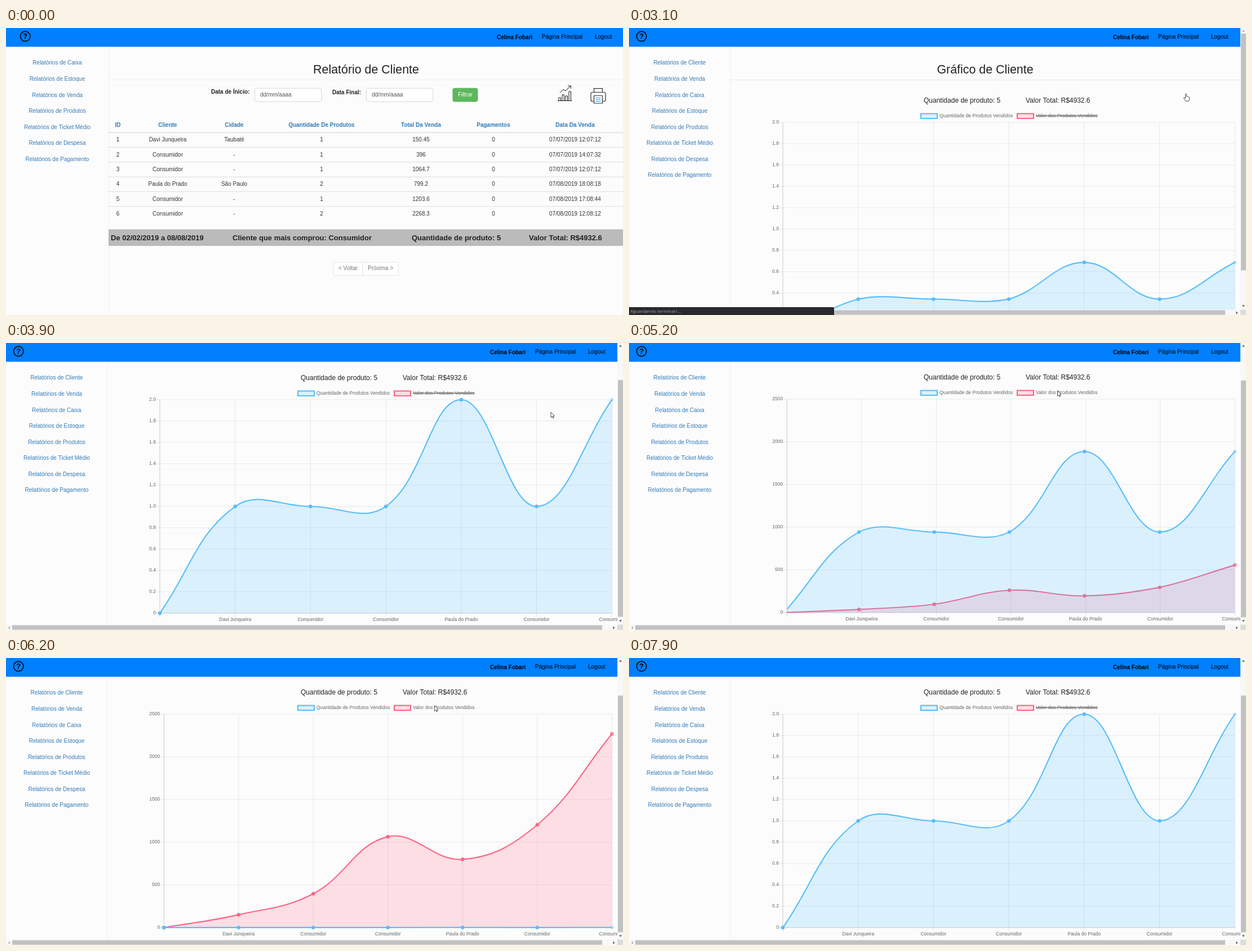
Recreate the animation shown at these times as an HTML page with a canvas. Size 1095 by 511 pixels, loop 8400 ms.

```html
<!DOCTYPE html>
<html lang="pt-BR">
<head>
<meta charset="utf-8">
<title>Relatório de Cliente</title>
<style>
  html, body { margin: 0; width: 100%; height: 100%; overflow: hidden; background: #fcfcfc; }
  canvas { display: block; width: 100vw; height: 100vh; }
</style>
</head>
<body>
<canvas id="stage" width="1095" height="511"></canvas>
<script>
const ctx = document.getElementById('stage').getContext('2d');
const W = 1095, H = 511, LOOP = 8400;
const SANS = '"Liberation Sans", Arial, sans-serif', UI = '"Open Sans", sans-serif';
const LINK = '#337ab7', BLUE = '86,190,252', PINK = '255,99,132';
const rgb = (c, alpha = 1) => `rgba(${c},${alpha})`;
const lerp = (a, b, u) => a + (b - a) * u;
const clamp = (v, lo = 0, hi = 1) => Math.min(hi, Math.max(lo, v));
const easeOut = (u, power) => 1 - (1 - clamp(u)) ** power;

const USER = 'Celina Fobari';
const BUYERS = ['Davi Junqueira', 'Consumidor', 'Consumidor', 'Paula do Prado', 'Consumidor', 'Consumidor'];
const QUANTITIES = [1, 1, 1, 2, 1, 2];
const TOTALS = [150.45, 396, 1064.7, 799.2, 1203.6, 2268.3];
const CITIES = ['Taubaté', '-', '-', 'São Paulo', '-', '-'];
const DATES = ['07/07/2019 12:07:12', '07/07/2019 14:07:32', '07/07/2019 12:07:12',
  '07/08/2019 18:08:18', '07/08/2019 17:08:44', '07/08/2019 12:08:12'];
const COLUMNS = [['ID', 198.5], ['Cliente', 287], ['Cidade', 405], ['Quantidade De Produtos', 560],
  ['Total Da Venda', 736.5], ['Pagamentos', 865], ['Data Da Venda', 1010]];

function text(str, x, y, { size = 10, color = '#333', align = 'left', bold = false, font = SANS } = {}) {
  ctx.font = `${bold ? 'bold ' : ''}${size}px ${font}`;
  ctx.fillStyle = color;
  ctx.textAlign = align;
  ctx.textBaseline = 'middle';
  ctx.fillText(str, x, y);
}
function rect(x, y, w, h, color) {
  ctx.fillStyle = color;
  ctx.fillRect(x, y, w, h);
}
function box(x, y, w, h, fill, stroke, radius = 3, width = 0.8) {
  ctx.beginPath();
  ctx.roundRect(x, y, w, h, radius);
  ctx.fillStyle = fill;
  ctx.fill();
  ctx.strokeStyle = stroke;
  ctx.lineWidth = width;
  ctx.stroke();
}
function path(d, x, y, stroke, width, fill) {
  const shape = new Path2D(d);
  ctx.save();
  ctx.translate(x, y);
  ctx.lineJoin = 'round';
  if (fill) { ctx.fillStyle = fill; ctx.fill(shape); }
  if (stroke) { ctx.strokeStyle = stroke; ctx.lineWidth = width; ctx.stroke(shape); }
  ctx.restore();
}

function header(width, shift) {
  rect(0, 0, width, 33.4, '#007fff');
  path('M8.7,0A8.7,8.7 0 1 1 -8.7,0A8.7,8.7 0 1 1 8.7,0', 34.2 - shift, 14.8, '#000', 1.6);
  text('?', 34.2 - shift, 15.3, { size: 13, bold: true, color: '#000', align: 'center' });
  text(USER, 871 - shift, 17, { bold: true, color: '#000' });
  text('Página Principal', 951 - shift, 16.2, { color: '#000' });
  text('Logout', 1045 - shift, 16.2, { color: '#000' });
}
function sidebar(topics, center, edge) {
  rect(edge - 0.5, 34, 1, H - 34, '#efefef');
  topics.forEach((topic, i) =>
    text('Relatórios de ' + topic, center, 62.7 + i * 28.55, { color: LINK, align: 'center' }));
}
function statusBar(str, width) {
  ctx.beginPath();
  ctx.roundRect(0, 497, width, 14, [0, 3, 0, 0]);
  ctx.fillStyle = '#292a2d';
  ctx.fill();
  text(str, 2.5, 504.5, { size: 8, color: '#a5a8ab', font: UI });
}

function chartIcon() {
  path('M0,27H25.5M2,27V21.5H5.5V27M8,27V16.5H11.5V27M14,27V18.5H17.5V27M20,27V10.5H23.5V27', 979, 102.5, '#111', 1);
  path('M4,13L10,7L14,9.5L23,.7M18,.5H23.3V5.5', 979, 102.5, '#111', 1);
}
function printerIcon() {
  path('M6,7.5V.7H21V7.5M6,23.5H3Q.5,23.5 .5,20.5V10.5Q.5,7.5 3,7.5H24Q26.5,7.5 26.5,10.5V20.5Q26.5,23.5 24,23.5H21', 1037.5, 107, '#333', 1.2);
  path('M6,13.5H21V27H6Z', 1037.5, 107, '#333', 1.2, '#fff');
  path('M9,17.5H18M9,20.5H18M9,23.5H18', 1037.5, 107, '#2f8fe0', 1);
}

function reportPage() {
  sidebar(['Caixa', 'Estoque', 'Venda', 'Produtos', 'Ticket Médio', 'Despesa', 'Pagamento'], 91, 182);
  header(W, 0);
  text('Relatório de Cliente', 639, 75, { size: 21.4, color: '#222', align: 'center' });
  rect(182, 92, W - 182, 1, '#eee');

  [['Data de Ínicio:', 364, 441.5], ['Data Final:', 579, 639.5]].forEach(([label, x, field], i) => {
    text(label, x, 114 + i, { bold: true, color: '#222' });
    box(field, 107.2, 118.5, 23.8, '#fff', '#ccc');
    text('dd/mm/aaaa', field + 9.5, 119.5, { color: '#555' });
  });
  box(793, 107.2, 44, 23.8, '#5cb85c', '#4cae4c');
  text('Filtrar', 815, 119, { color: '#fff', align: 'center' });
  chartIcon();
  printerIcon();

  COLUMNS.forEach(([name, x]) => text(name, x, 172.8, { bold: true, color: LINK, align: 'center' }));
  rect(182, 185.5, W - 182, 1.4, '#ddd');
  BUYERS.forEach((buyer, i) => {
    const cells = [i + 1, buyer, CITIES[i], QUANTITIES[i], TOTALS[i], 0, DATES[i]];
    cells.forEach((cell, c) => text(cell, COLUMNS[c][1], 199.7 + i * 26.3, { align: 'center' }));
    if (i) rect(182, 185.7 + i * 26.3, W - 182, 1, '#ddd');
  });

  rect(182, 358.5, W - 182, 29.5, '#bbb');
  [['De 02/02/2019 a 08/08/2019', 186], ['Cliente que mais comprou: Consumidor', 402],
    ['Quantidade de produto: 5', 720], ['Valor Total: R$4932.6', 928]]
    .forEach(([str, x]) => text(str, x, 374.5, { size: 13, bold: true, color: '#222' }));

  box(581, 417, 115.5, 23.5, '#fff', '#ddd');
  rect(632.5, 417, 1, 23.5, '#ddd');
  text('< Voltar', 590, 428.5, { color: '#777' });
  text('Próxima >', 642, 428.5, { color: '#777' });
}

// Chart geometry: 548 is the unscrolled zero line, 380 the plot height.
const RIGHT = 1075.3, BASE = 548, TALL = 380;
const SMALL = { left: 273, max: 2, step: 0.2, label: v => v.toFixed(1) };
const LARGE = { left: 280.3, max: 2500, step: 500, label: v => String(v) };
const xAt = (axis, i) => lerp(axis.left, RIGHT, i / 6);

// Each node holds the point, its incoming handle and its outgoing handle.
function spline(values, axis) {
  const pts = [0, ...values].map((v, i) => [xAt(axis, i), BASE - v / axis.max * TALL]);
  const capY = y => clamp(y, BASE - TALL, BASE);
  return pts.map((p, i) => {
    const prev = pts[i - 1] || p, next = pts[i + 1] || p;
    const before = Math.hypot(p[0] - prev[0], p[1] - prev[1]);
    const after = Math.hypot(next[0] - p[0], next[1] - p[1]);
    const a = 0.4 * before / (before + after), b = 0.4 * after / (before + after);
    const dx = next[0] - prev[0], dy = next[1] - prev[1];
    return [...p, p[0] - a * dx, capY(p[1] - a * dy), p[0] + b * dx, capY(p[1] + b * dy)];
  });
}
const blend = (from, to, u) => from.map((node, i) => node.map((v, k) => lerp(v, to[i][k], u)));
const FLAT = spline(QUANTITIES.map(() => 0), SMALL);
const QTY_SMALL = spline(QUANTITIES, SMALL), QTY_LARGE = spline(QUANTITIES, LARGE);
const SUM_LARGE = spline(TOTALS, LARGE);

function drawSeries(nodes, color, axis, fadeLast) {
  const curve = new Path2D();
  curve.moveTo(nodes[0][0], nodes[0][1]);
  nodes.slice(1).forEach((n, i) => curve.bezierCurveTo(nodes[i][4], nodes[i][5], n[2], n[3], n[0], n[1]));
  const area = new Path2D(curve);
  area.lineTo(nodes[6][0], BASE);
  area.lineTo(nodes[0][0], BASE);
  ctx.save();
  ctx.beginPath();
  ctx.rect(axis.left, BASE - TALL - 1.1, RIGHT - axis.left + 0.7, TALL + 2.2);
  ctx.clip();
  ctx.fillStyle = rgb(color, 0.2);
  ctx.fill(area);
  ctx.strokeStyle = rgb(color);
  ctx.lineWidth = 2.14;
  ctx.stroke(curve);
  ctx.restore();
  nodes.forEach(([x, y], i) => {
    if (x < axis.left - 0.6) return;
    const last = i === 6;
    ctx.beginPath();
    ctx.arc(x, y, last ? 2.4 : 2.5, 0, 7);
    ctx.fillStyle = rgb(color, last ? 0.4 : 1);
    ctx.fill();
    ctx.strokeStyle = rgb(color, last && fadeLast ? 0.25 : 1);
    ctx.lineWidth = 1.4;
    ctx.stroke();
  });
}

function drawAxes(axis) {
  const count = Math.round(axis.max / axis.step);
  for (let i = 0; i <= count; i++) {
    const y = BASE - i / count * TALL;
    rect(axis.left - 7, y - 0.4, RIGHT - axis.left + 7, 0.8, i ? 'rgba(0,0,0,.1)' : 'rgba(0,0,0,.25)');
    text(i ? axis.label(i * axis.step) : '0', axis.left - 7, y, { size: 8.56, color: '#666', align: 'right' });
  }
  for (let i = 0; i <= 6; i++) {
    const x = xAt(axis, i);
    rect(x - 0.4, BASE - TALL, 0.8, TALL + 7, i ? 'rgba(0,0,0,.1)' : 'rgba(0,0,0,.25)');
    if (i) text(BUYERS[i - 1], x, BASE + 11.7, { size: 8.56, color: '#666', align: 'center' });
  }
}

function legend(both) {
  [['Quantidade de Produtos Vendidos', 517.5, BLUE], ['Valor dos Produtos Vendidos', 688.5, PINK]]
    .forEach(([label, x, color], i) => {
      box(x + 0.5, 152.5, 29, 8.5, rgb(color, 0.2), rgb(color), 0, 2.14);
      text(label, x + 33.5, 156.5, { size: 8.56, color: '#666' });
      if (i && !both) rect(x + 33.5, 155.7, ctx.measureText(label).width, 1.4, '#666');
    });
}

function scrollbars(scroll) {
  rect(1085, 0, 10, H, '#f8f8f8');
  rect(0, 501.5, W, 9.5, '#f8f8f8');
  rect(1086, 10 + scroll * 0.835, 9, 421.5, '#c1c1c1');
  rect(11, 502.5, 1047, 8, '#c1c1c1');
  rect(1085, 501.5, 10, 9.5, '#dcdcdc');
  path('M-2.5,1.5L0,-1.5L2.5,1.5Z', 1090.5, 5, null, 0, scroll ? '#505050' : '#a3a3a3');
  path('M-2.5,-1.5L0,1.5L2.5,-1.5Z', 1090.5, 495, null, 0, '#505050');
  path('M1.5,-2.5L-1.5,0L1.5,2.5Z', 5.5, 507, null, 0, '#a3a3a3');
  path('M-1.5,-2.5L1.5,0L-1.5,2.5Z', 1079, 507, null, 0, '#505050');
}

const LOADED = 3000, SHOW_SUM = 5132, HIDE_SUM = 6430;
function chartPage(t) {
  const scroll = Math.round(68 * easeOut((t - 3700) / 270, 3));
  const both = t >= SHOW_SUM && t < HIDE_SUM;
  const axis = both ? LARGE : SMALL;
  const start = both ? SHOW_SUM : t >= HIDE_SUM ? HIDE_SUM : LOADED;
  const u = easeOut((t - start) / 1000, 4);

  sidebar(['Cliente', 'Venda', 'Caixa', 'Estoque', 'Produtos', 'Ticket Médio', 'Despesa', 'Pagamento'], 90, 180);
  ctx.save();
  ctx.translate(0, -scroll);
  text('Gráfico de Cliente', 632, 75, { size: 21.4, color: '#222', align: 'center' });
  rect(180, 92, 905, 1, '#e8e8e8');
  text('Quantidade de produto: 5', 523, 130, { size: 12, color: '#222' });
  text('Valor Total: R$4932.6', 704, 130, { size: 12, color: '#222' });
  legend(both);
  drawAxes(axis);
  if (both) {
    drawSeries(blend(FLAT, SUM_LARGE, u), PINK, axis, false);
    drawSeries(blend(QTY_SMALL, QTY_LARGE, u), BLUE, axis, true);
  } else {
    drawSeries(blend(t < SHOW_SUM ? FLAT : QTY_LARGE, QTY_SMALL, u), BLUE, axis, true);
  }
  ctx.restore();
  header(1085, 12);
  scrollbars(scroll);
}

const CURSOR_PATH = [[100, 1088, 405], [900, 990, 120], [1000, 988.5, 117], [3100, 988.5, 117], [3900, 967, 123],
  [4000, 967, 123], [4600, 760.5, 85], [7300, 760.5, 85], [7900, 700, 515]];
function cursor(t) {
  const i = CURSOR_PATH.findIndex(key => key[0] > t);
  if (i < 1) return;
  const [t0, x0, y0] = CURSOR_PATH[i - 1], [t1, x1, y1] = CURSOR_PATH[i];
  const p = (t - t0) / (t1 - t0), u = p * p * (3 - 2 * p);
  const hand = t >= 1000 && t < 3200;
  const d = hand
    ? 'M-1,8V1.2Q-1,0 0,0T1,1.2V5Q2,4 3,5.3Q4,4.6 4.8,5.8Q6,5.4 6,7V9.5Q6,11 5,13H-.5Q-2,10.5 -4,8.2Q-4.5,6.6 -2.5,7Z'
    : 'M0,0V9.6L2.2,7.6L3.7,10.8L5.1,10.1L3.7,7.1H6.7Z';
  path(d, lerp(x0, x1, u), lerp(y0, y1, u), '#222', 0.8, '#fff');
}

function render(t) {
  rect(0, 0, W, H, '#fcfcfc');
  if (t < 3100) reportPage();
  else chartPage(t);
  if (t >= 2800 && t < 3300) statusBar('Aguardando terminal1...', 364);
  else if (t >= 1000 && t < 2800) statusBar('terminal1/painel/consultas/listaCliente/', 170);
  cursor(t);
  if (t >= 1600 && t < 2200) {
    box(994.5, 127.5, 38, 17, '#fff', '#767676', 0, 0.9);
    text('Grafico', 1000, 136, { size: 8, color: '#444', font: UI });
  }
}

// The picture advances in steps of 100 ms, with one step held at 5200.
function tick(now) {
  const step = Math.floor(now % LOOP / 100) * 100;
  render(step === 5300 ? 5200 : step);
  requestAnimationFrame(tick);
}
render(0);
requestAnimationFrame(tick);
</script>
</body>
</html>
```
